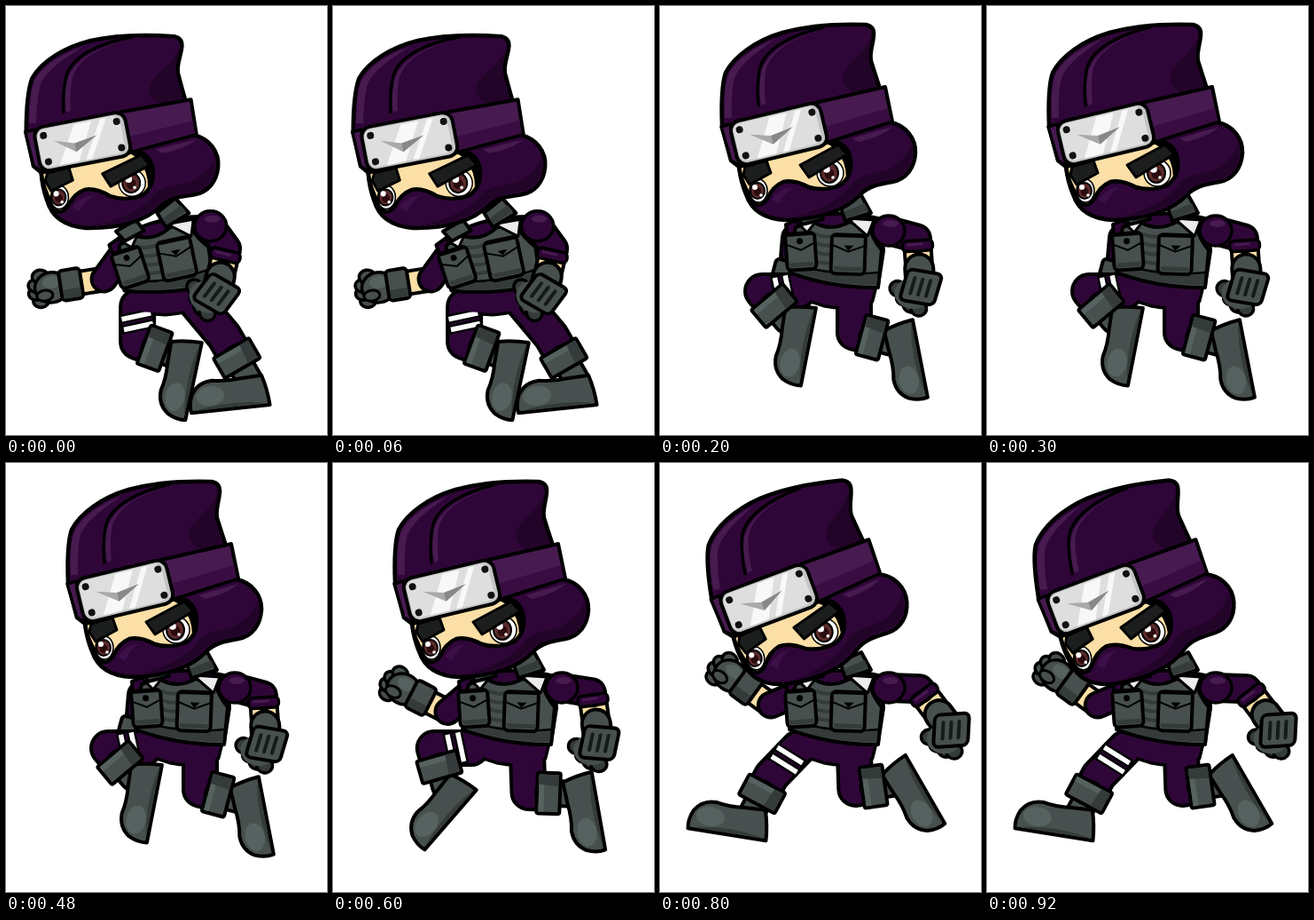
Recreate the animation shown at these times as an HTML page. Size 362x483 px, loop 1000 ms.

```html
<!DOCTYPE html>
<html lang="en">
<head>
<meta charset="utf-8">
<title>Ninja run</title>
<style>
html, body { margin: 0; width: 100%; height: 100%; overflow: hidden; background: #fff; }
svg { display: block; width: 100%; height: 100%; }
</style>
</head>
<body>
<svg id="stage" viewBox="0 0 362 483"></svg>
<script>
const INK = '#000', PURPLE = '#2f0638', LIGHT = '#471a50', DEEP = '#230429';
const GREY = '#47504e', PALE = '#566260', DARK = '#343b3a', SKIN = '#fbdfa6';
const NECK = [165, 238], CHEST = [186, 258];

// Key poses. head, torso: dx, dy, turn. Legs: thigh, shin and sole angles, stretch.
// Arms: upper and lower angles, stretch. Angles run clockwise from the right.
const crouch = {
  head: [-52, 10, 2.6], torso: [-24, 12, -14],
  farLeg: [90, 20, -78, .97], nearLeg: [50, 60, -6, 1.33],
  farArm: [126, 171, 1.05], nearArm: [54, 103, .95]
};
const leap = {
  head: [0, 0, 0], torso: [0, 0, 0],
  farLeg: [180, 50, -79, 1], nearLeg: [90, 15, -101, .97],
  farArm: [95, 105, .6], nearArm: [15, 86, 1]
};
const kick = { ...leap, farLeg: [180, 74, -49, 1.03], nearLeg: [88, 2, -100, 1.05], farArm: [140, 207, .95], nearArm: [9, 82, 1.04] };
const stride = { ...leap, head: [0, 5, -7], farLeg: [134, 118, 9, 1.06], nearLeg: [88, -8, -120, .95], farArm: [157, 216, .95], nearArm: [2, 53, 1.06] };

const mix = (a, b, k) => Object.fromEntries(Object.keys(a).map(part => [part, a[part].map((v, i) => v + (b[part][i] - v) * k)]));

// Each move takes three held steps of 100 ms.
function poseAt(t) {
  const k = Math.min(1, Math.floor(t % 600 / 100) / 2);
  return t < 600 ? mix(crouch, leap, k) : mix(kick, stride, 1 - (1 - k) ** 1.4);
}

const rad = a => a * Math.PI / 180;
const reach = ([x, y], angle, length) => [x + length * Math.cos(rad(angle)), y + length * Math.sin(rad(angle))];
const between = (a, b, k) => [a[0] + (b[0] - a[0]) * k, a[1] + (b[1] - a[1]) * k];
const onTorso = ([dx, dy, turn], x, y) => {
  const c = Math.cos(rad(turn)), s = Math.sin(rad(turn)), u = x - CHEST[0], v = y - CHEST[1];
  return [CHEST[0] + dx + u * c - v * s, CHEST[1] + dy + u * s + v * c];
};

const path = (d, fill, w = 0) => `<path d="${d}" fill="${fill}" stroke="${w ? INK : 'none'}" stroke-width="${w}" stroke-linejoin="round"/>`;
const line = (d, w = 3, color = INK, cap = 'round') => `<path d="${d}" fill="none" stroke="${color}" stroke-width="${w}" stroke-linecap="${cap}" stroke-linejoin="round"/>`;
const oval = (x, y, rx, ry, fill, w = 0) => `<ellipse cx="${x}" cy="${y}" rx="${rx}" ry="${ry}" fill="${fill}" stroke="${INK}" stroke-width="${w}"/>`;
const box = (x, y, w, h, r, fill, s = 0) => `<rect x="${x}" y="${y}" width="${w}" height="${h}" rx="${r}" fill="${fill}" stroke="${INK}" stroke-width="${s}"/>`;
const put = ([x, y], turn, body) => `<g transform="translate(${x} ${y}) rotate(${turn})">${body}</g>`;
const about = ([dx, dy, turn], pivot, body) => `<g transform="translate(${dx} ${dy}) rotate(${turn} ${pivot})">${body}</g>`;
const limb = (points, w, color, cap) => {
  const d = 'M' + points.join('L');
  return line(d, w, INK, cap) + line(d, w - 8, color, cap);
};

const plate =
  box(-52, -25, 104, 50, 11, '#c4c4c6', 4) + box(-49, -22, 95, 43, 9, '#dededf') +
  path('M-30 21L-6 -21H14L-8 21ZM0 21L24 -21H31L7 21Z', '#f8f8f8') +
  path('M-32 -7L-9 0L17 -4L-9 10Z', '#a9a9ab') + path('M-9 0L17 -4L-9 10Z', '#88888b') +
  [-1, 1].map(x => [-1, 1].map(y => oval(x * 42, y * 15, 4, 4, '#111')).join('')).join('');

const eye = (x, y, rx, ry, r) =>
  oval(x, y, rx, ry, '#fff', 1.5) + oval(x - 1, y, r, r + 1, '#5c2b2b', 2) + oval(x - 1, y + 1, r * .55, r * .6, '#2a0b0e') +
  oval(x - 4, y - 4, r * .38, r * .38, '#fff') + oval(x + 3, y + 5, 1.8, 1.8, '#fff');

const headArt =
  path('M70 136C69 112 69 90 74 75C84 56 108 39 138 30C167 22 200 20 232 21Q242 23 241 33C240 45 236 52 238 62Q243 78 248 93L260 131C276 134 289 148 288 166C287 182 278 195 262 198C245 201 235 203 226 212C210 230 180 240 142 241C118 240 103 230 97 212Q91 198 89 181L80 174Z', PURPLE, 4.5) +
  path('M73 126C72 102 73 86 78 75C88 58 108 46 130 37C110 51 87 67 83 85Q80 104 81 126Z', LIGHT) +
  path('M238 35C230 54 212 64 207 76Q203 92 222 98L245 91Q240 74 235 63C234 52 238 45 238 35Z', DEEP) +
  path('M188 26C152 34 124 50 119 74Q117 92 119 110L114 112Q110 88 114 74C122 50 150 34 188 26Z', LIGHT) +
  line('M184 24C150 32 116 48 112 73Q109 92 111 112', 3.5) +
  path('M284 155C288 178 276 193 259 195C240 199 229 203 221 212C206 227 180 236 150 238C185 229 208 214 217 200C228 186 250 190 262 181Q278 172 284 155Z', DEEP) +
  path('M217 149Q240 142 262 136Q250 147 224 153Z', LIGHT) +
  path('M175 109L254 91L262 130L187 154Z', LIGHT, 4) + path('M186 136L257 115L260 129L188 151Z', '#390d42') +
  path('M69 136L79 133L91 180L80 174Z', LIGHT, 3.5) +
  path('M89 181L187 154Q207 149 214 168Q219 191 203 202Q185 209 168 204Q151 195 139 198Q127 203 121 217Q110 233 101 213Q92 199 89 181Z', SKIN, 4.5) +
  path('M187 154Q207 149 214 168Q216 181 210 193Q210 175 198 161Z', INK) +
  eye(192, 188, 15, 15, 10) + eye(111, 208, 10, 13, 8) +
  path('M96 181L120 174L125 188L101 201L94 190Z', '#1c1e1e', 3) +
  path('M158 179L201 156L211 167L168 193Z', '#1c1e1e', 3) +
  path('M126 218Q135 204 150 204Q140 210 134 223Z', '#3d0f48') +
  put([134, 144], -13.5, plate);

const pocket = (x, y, w, h, turn, mark) => put([x, y], turn,
  box(0, 0, w, h, 5, GREY, 4) + path(`M3 ${h - 8}H${w - 3}V${h - 3}H4Z`, DARK) +
  path(`M1 2H${w - 1}V12L${w / 2} 19L1 12Z`, GREY, 2) + mark);

const torsoArt =
  path('M142 246Q190 225 250 240L252 276L246 315Q195 318 147 300Z', PURPLE, 4) +
  path('M153 249L173 243Q192 255 214 243L236 249Q240 263 250 275L246 317Q195 318 146 300Q147 275 153 249Z', GREY, 4) +
  path('M149 292Q198 306 245 302L244 314Q195 315 149 299Z', DARK) +
  path('M153 242L180 237L166 255Z', '#ececec', 3) + path('M211 239L241 241L234 259Z', '#ececec', 3) +
  path('M153 233L178 226L184 240L160 246Z', GREY, 4) +
  path('M203 224L227 213L238 233L209 242Z', GREY, 4) + path('M207 232L231 222L235 230L211 239Z', DARK) +
  [0, 1, 2, 3].map(i => line(`M176 ${257 + i * 10}Q185 ${261 + i * 10} 194 ${259 + i * 10}`, 4, DARK)).join('') +
  line('M148 290Q196 305 247 300', 2.5) +
  pocket(141, 257, 33, 41, -4, oval(16, 9, 3.5, 3.5, INK)) +
  pocket(194, 257, 38, 44, 2, path('M14 12L25 12L19 18Z', INK));

const pelvis = 'M153 302L243 312L238 332Q214 342 185 336L160 328Z';

const bootArt =
  path('M0 0Q-1 -18 -6 -34L-30 -33Q-48 -31 -62 -34Q-78 -34 -86 -21Q-91 -10 -89 0Z', GREY, 4) +
  oval(-66, -17, 16, 11, PALE) + path('M-86 -2Q-40 -11 -2 -2Z', DARK);

const cuffArt = box(-23, -13, 46, 26, 2, GREY, 4) + path('M-21 -11H21V-5H-21Z', PALE) + path('M10 -11H21V11H8Z', DARK);

const stripeArt = [-6, 6].map(x => box(x - 4, -18, 8, 36, 0, '#fff', 2.5)).join('');

function leg(hip, [thigh, shin, sole, stretch], striped) {
  const knee = reach(hip, thigh, 41 * stretch), ankle = reach(knee, shin, 43 * stretch);
  const heel = reach(reach(ankle, sole, 20), sole + 90, 30);
  return limb([hip, knee, between(knee, ankle, .4)], 42, PURPLE) +
    (striped ? put(between(hip, knee, .42), thigh - 192, stripeArt) : '') +
    limb([between(knee, ankle, .5), ankle], 32, GREY) +
    put(heel, sole, bootArt) + put(between(knee, ankle, .5), shin - 90, cuffArt);
}

const fistArt =
  [0, 1, 2, 3].map(i => oval(-39 + 4 * (i - 1.3) ** 2 * .6, 13 - i * 9, 9, 7.5, GREY, 3.5)).join('') +
  oval(-21, 0, 19, 17, GREY, 3.5) + oval(-20, -6, 11, 7, PALE) + oval(-30, 8, 9, 6, GREY, 3) +
  box(-11, -17, 24, 34, 4, GREY, 4) + path('M-9 5H11V15H-9Z', DARK);

const gripArt =
  [0, 1, 2, 3].map(i => oval(-25 + 9 * i, 6 + 18 * Math.sin(i * .52), 9, 8.5, DARK, 3.5)).join('') + oval(-8, 9, 20, 17, GREY) +
  `<g transform="skewX(-7)">${box(-19, -18, 39, 36, 6, GREY, 4)}${[-9, 0, 9].map(x => box(x - 2, -11, 4, 22, 2, '#161a19')).join('')}</g>`;

function farArm(shoulder, [upper, lower, stretch]) {
  const elbow = reach(shoulder, upper, 31 * stretch), wrist = reach(elbow, lower, 37 * stretch);
  return limb([elbow, wrist], 30, SKIN, 'butt') + limb([shoulder, elbow], 32, PURPLE) + put(wrist, lower - 180, fistArt);
}

function nearArm(shoulder, [upper, lower, stretch]) {
  const elbow = reach(shoulder, upper, 33 * stretch), hand = reach(elbow, lower, 55 * stretch);
  const wrist = between(elbow, hand, .62);
  const sleeve = box(-17, -6, 34, 12, 5, PURPLE, 3.5) + path('M-12 -3H6V0H-12Z', LIGHT);
  return limb([elbow, wrist], 34, SKIN, 'butt') + limb([shoulder, elbow], 34, PURPLE) +
    put(between(elbow, hand, .15), lower - 90, sleeve) +
    oval(...shoulder, 18, 17, PURPLE, 3.5) + oval(shoulder[0] + 2, shoulder[1] - 8, 9, 4, LIGHT) +
    limb([wrist, hand], 36, GREY) + put(hand, Math.max(-4, (lower - 78) * 1.2), gripArt);
}

function draw(p) {
  const joint = (x, y) => onTorso(p.torso, x, y);
  return farArm(joint(152, 261), p.farArm) +
    about(p.torso, CHEST, path(pelvis, PURPLE, 7)) +
    leg(joint(156, 321), p.farLeg, true) +
    leg(joint(219, 328), p.nearLeg) +
    about(p.torso, CHEST, path(pelvis, PURPLE) + torsoArt) +
    nearArm(joint(258, 253), p.nearArm) +
    about(p.head, NECK, headArt);
}

const stage = document.getElementById('stage');
const begin = performance.now();
let shown = -1;

function update(now) {
  const t = Math.max(0, now - begin) % 1000, step = Math.floor(t / 100);
  if (step !== shown) stage.innerHTML = draw(poseAt(t));
  shown = step;
  requestAnimationFrame(update);
}
update(begin);
</script>
</body>
</html>
```
